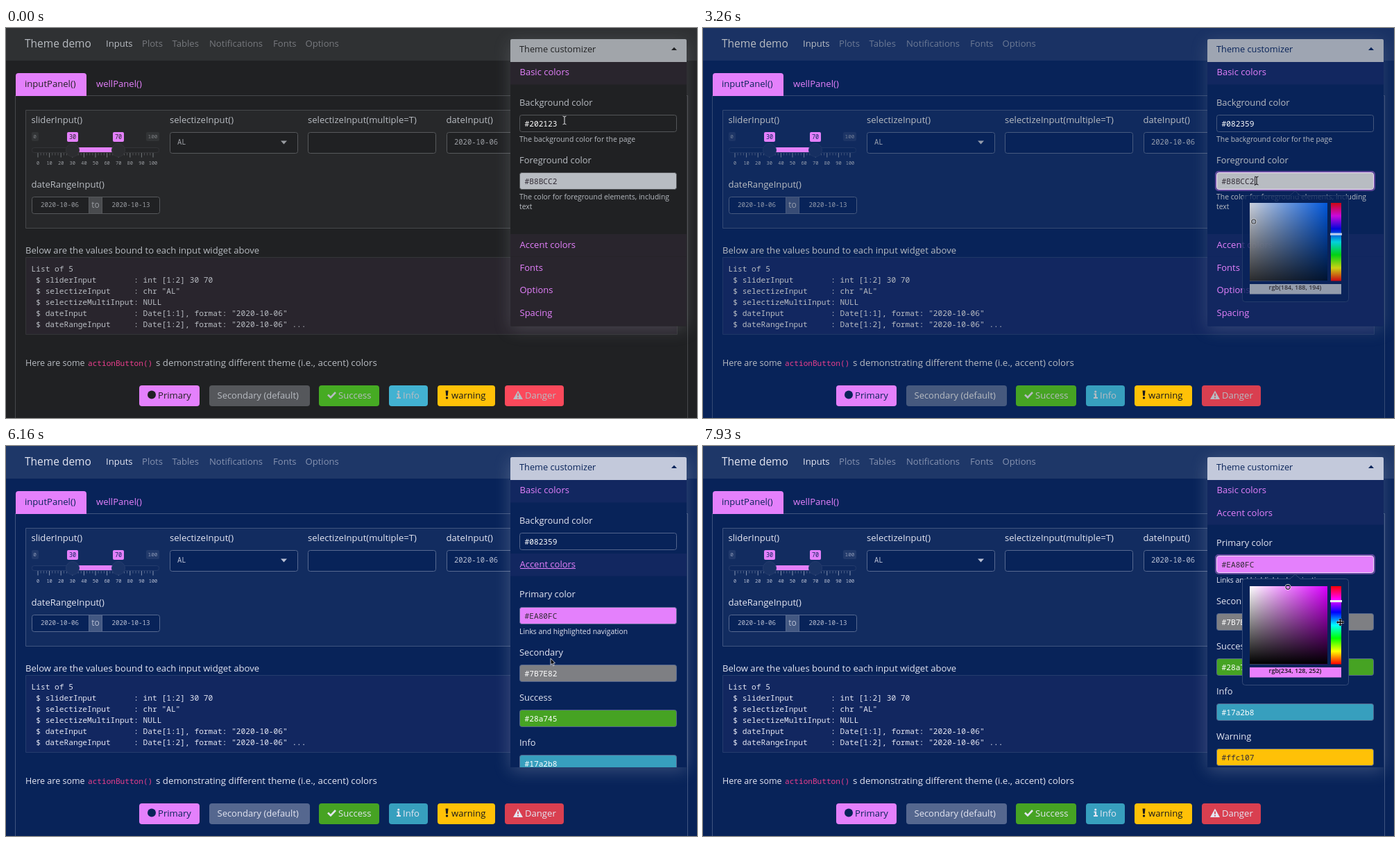
An HTML page with a canvas for the animation above (8000 ms loop, 996 by 562 pixels).

```html
<!DOCTYPE html>
<html lang="en">
<head>
<meta charset="utf-8">
<title>Theme demo</title>
<style>
html, body { margin: 0; width: 100%; height: 100%; overflow: hidden; background: #202123; }
canvas { display: block; width: 996px; height: 562px; }
</style>
</head>
<body>
<canvas id="stage" width="996" height="562"></canvas>
<script>
const ctx = document.getElementById('stage').getContext('2d');
const LOOP = 8000;
const SANS = '"Open Sans", "Noto Sans", sans-serif';
const MONO = '"Noto Sans Mono", "DejaVu Sans Mono", monospace';
const PINK = [228, 128, 252], WHITE = [255, 255, 255], INK = [50, 44, 54];
const PRIMARY = [234, 128, 252];
const DARK = [32, 33, 35], NAVY = [8, 35, 89];
const GREY = [184, 188, 194], PALE = [228, 230, 242];
const YELLOW = [255, 193, 7];

const clamp = v => Math.max(0, Math.min(1, v));
const ramp = (t, a, b) => clamp((t - a) / (b - a));
const mix = (a, b, k) => a.map((v, i) => v + (b[i] - v) * k);
const css = (c, a = 1) => `rgba(${c.map(Math.round).join(',')},${a})`;
const hex = c => '#' + c.map(v => v.toString(16).padStart(2, '0')).join('').toUpperCase();

// cubic-bezier(.25, .1, .25, 1)
function ease(x) {
  let lo = 0, hi = 1, u = x;
  for (let i = 0; i < 20; i++) {
    u = (lo + hi) / 2;
    const bx = .75 * u * (1 - u) + u ** 3;
    if (bx < x) lo = u; else hi = u;
  }
  return .3 * u * (1 - u) * (1 - u) + 3 * u * u * (1 - u) + u ** 3;
}

function text(s, x, y, color, size = 13.1, font = SANS, align = 'left', weight = 400) {
  ctx.font = `${weight} ${size}px ${font}`;
  ctx.textAlign = align;
  ctx.fillStyle = css(color);
  ctx.fillText(s, x, y);
}
const mono = (s, x, y, color, size = 11.2, align) => text(s, x, y, color, size, MONO, align);

function box(x, y, w, h, fill, stroke, r = 0) {
  ctx.beginPath();
  ctx.roundRect(x, y, w, h, r);
  if (fill) { ctx.fillStyle = css(fill); ctx.fill(); }
  if (stroke) { ctx.strokeStyle = css(stroke); ctx.lineWidth = 1; ctx.stroke(); }
}

function poly(points, fill) {
  ctx.beginPath();
  points.forEach(([x, y]) => ctx.lineTo(x, y));
  ctx.closePath();
  ctx.fillStyle = css(fill);
  ctx.fill();
}

function line(points, color, width) {
  ctx.beginPath();
  points.forEach(([x, y]) => ctx.lineTo(x, y));
  ctx.strokeStyle = css(color);
  ctx.lineWidth = width;
  ctx.stroke();
}

function circle(x, y, r, fill, stroke, width = 1) {
  ctx.beginPath();
  ctx.arc(x, y, r, 0, Math.PI * 2);
  if (fill) { ctx.fillStyle = css(fill); ctx.fill(); }
  if (stroke) { ctx.strokeStyle = css(stroke); ctx.lineWidth = width; ctx.stroke(); }
}

function themeAt(t) {
  const toNavy = t < 2200 ? 0 : t < 2230 ? .5 : 1;
  const toPale = ramp(t, 4800, 4960);
  const bg = mix(DARK, NAVY, toNavy), fg = mix(GREY, PALE, toPale);
  return {
    bg, fg,
    shade: k => mix(bg, fg, k),
    tint: mix(bg, PINK, .045),
    green: mix([70, 171, 35], [70, 163, 35], toNavy),
    info: mix([66, 178, 209], [55, 159, 190], toNavy),
    red: mix([251, 73, 91], [217, 63, 80], toNavy)
  };
}

function slider(th) {
  const { bg, shade } = th;
  box(37.5, 172.5, 183, 7, shade(.03), shade(.13), 3);
  for (let i = 0; i <= 40; i++) {
    const big = i % 4 === 0, x = 46 + i * 4.15;
    line([[x, 180], [x, big ? 186.5 : 183.5]], shade(big ? .7 : .4), .8);
  }
  for (let i = 0; i <= 10; i++) mono(i * 10, 46 + i * 16.6, 196.5, shade(.8), 7, 'center');
  box(96, 172, 66, 7, PINK);
  [96, 162].forEach(x => circle(x, 176, 9.5, shade(.08), shade(.13)));
  box(37, 150, 10, 13, shade(.12), null, 2);
  mono('0', 41.5, 159, shade(.6), 7.8, 'center');
  box(202, 150, 19, 13, shade(.12), null, 2);
  mono('100', 211.5, 159, shade(.6), 7.8, 'center');
  [[96, '30'], [162, '70']].forEach(([x, s]) => {
    box(x - 8, 150, 16, 14, PINK, null, 2);
    mono(s, x, 159.5, bg, 8.4, 'center');
  });
}

function buttons(th) {
  const { bg, fg, shade, green, info, red } = th;
  [[192, 87, PINK], [293, 145, shade(.35)], [451, 87, green], [552, 56, info],
   [622, 83, YELLOW], [719, 85, red]].forEach(([x, w, c]) => box(x, 515, w, 30, c, null, 4));
  const y = 533.5;
  circle(210, 528.5, 6, bg);
  text('Primary', 219, y, bg);
  text('Secondary (default)', 304.5, y, fg, 13);
  line([[464, 528.5], [468, 532.5], [475, 525]], fg, 2.6);
  text('Success', 479, y, fg);
  circle(565.8, 524, 1.6, fg);
  line([[563.5, 527.5], [566, 527.5], [566, 533]], fg, 2.2);
  line([[563, 533], [569, 533]], fg, 2);
  text('Info', 572, y, fg);
  const black = [25, 25, 28];
  poly([[633.5, 522.5], [637.5, 522.5], [636.7, 530], [634.3, 530]], black);
  circle(635.5, 533, 1.7, black);
  text('warning', 642, y, black, 13.1, SANS, 'left', 500);
  poly([[738, 522.5], [745, 535], [731, 535]], fg);
  line([[738, 526.5], [738, 530.5]], red, 1.7);
  circle(738, 532.7, 1, red);
  text('Danger', 748, y, fg);
}

function page(th) {
  const { bg, fg, shade } = th;
  ctx.fillStyle = css(bg);
  ctx.fillRect(0, 0, 996, 562);
  box(0, 0, 996, 47, shade(.1));
  text('Theme demo', 27, 27.5, fg, 15.5);
  [['Inputs', 144], ['Plots', 196], ['Tables', 239.5], ['Notifications', 293], ['Fonts', 385], ['Options', 431.5]]
    .forEach(([s, x], i) => text(s, x, 27, i ? shade(.57) : fg));

  const edge = shade(.25);
  line([[13.5, 570], [13.5, 97.5], [982.5, 97.5], [982.5, 570]], edge, 1);
  box(14, 65, 102, 33, PINK, null, [4, 4, 0, 0]);
  text('inputPanel()', 27, 84.5, bg);
  text('wellPanel()', 130, 84.5, PINK);

  box(28.5, 118.5, 939, 170, shade(.045), edge);
  [['sliderInput()', 36.5], ['selectizeInput()', 236], ['selectizeInput(multiple=T)', 435], ['dateInput()', 634.5]]
    .forEach(([s, x]) => text(s, x, 136.5, fg));
  slider(th);
  const border = shade(.36), soft = shade(.8);
  [236.5, 435.5, 635.5].forEach(x => box(x, 150.5, 184, 30, bg, border, 3));
  mono('AL', 247, 168, soft, 10.5);
  poly([[396, 162.5], [405, 162.5], [400.5, 167.5]], soft);
  mono('2020-10-06', 646, 168, soft, 10.5);
  text('dateRangeInput()', 36.5, 229.5, fg);
  box(37.5, 243.5, 184, 24, bg, border, 3);
  box(119.5, 243.5, 19, 24, shade(.27), border);
  text('to', 129, 258.5, soft, 12, SANS, 'center');
  mono('2020-10-06', 50, 257.5, soft, 9.2);
  mono('2020-10-13', 152.5, 257.5, soft, 9.2);

  text('Below are the values bound to each input widget above', 28, 324.5, fg);
  box(28.5, 330.5, 939, 111, th.tint, shade(.13));
  ['List of 5',
   ' $ sliderInput        : int [1:2] 30 70',
   ' $ selectizeInput     : chr "AL"',
   ' $ selectizeMultiInput: NULL',
   ' $ dateInput          : Date[1:1], format: "2020-10-06"',
   ' $ dateRangeInput     : Date[1:2], format: "2020-10-06" ...'
  ].forEach((s, i) => mono(s, 36.5, 351 + i * 16, fg));

  text('Here are some', 28, 487, fg, 12.5);
  mono('actionButton()', 118, 486.5, [232, 62, 140], 11.1);
  text('s demonstrating different theme (i.e., accent) colors', 216, 487, fg, 13.3);
  buttons(th);
}

function field(th, y, value, color, focus, caret) {
  const lum = color[0] * .3 + color[1] * .59 + color[2] * .11;
  const ink = lum > 150 ? INK : WHITE;
  if (focus > 0) {
    ctx.beginPath();
    ctx.roundRect(739, y - 1, 229, 27, 4);
    ctx.strokeStyle = css(PINK, .4 * focus);
    ctx.lineWidth = 2;
    ctx.stroke();
  }
  box(740.5, y + .5, 226, 24, color, mix(th.shade(.34), [246, 220, 254], focus), 3);
  mono(value, 747.5, y + 16.7, ink);
  if (caret) line([[795.5, y + 6.5], [795.5, y + 19]], ink, 1);
}

const blink = (t, from, to) => t >= from && t < to && Math.floor((t - from) / 500) % 2 === 0;

function panel(th, t, bgValue, fgValue) {
  const { bg, fg, shade, tint } = th;
  const p = ease(ramp(t, 6027, 6377));
  const top = Math.round(297 - 216 * p), rowH = 32.6;
  const fontsTop = top + rowH + 455 * p;
  const bottom = Math.min(463, fontsTop + 3 * rowH + 2);

  ctx.save();
  ctx.shadowColor = css(fg, .22);
  ctx.shadowBlur = 24;
  ctx.shadowOffsetY = 5;
  box(727, 16, 254, bottom - 16, bg, null, 2);
  ctx.restore();
  box(727, 16, 254, 33, shade(.85), null, [2, 2, 0, 0]);
  text('Theme customizer', 740, 35.2, bg, 12.8, SANS, 'left', 500);
  poly([[959, 32], [967, 32], [963, 27.8]], bg);

  ctx.save();
  ctx.beginPath();
  ctx.rect(727, 49, 254, bottom - 49);
  ctx.clip();
  box(727, 49, 254, rowH, tint);
  text('Basic colors', 740.5, 68.3, PINK, 13);

  const focusBg = ramp(t, 30, 180) * (1 - ramp(t, 2950, 3080));
  const focusFg = ramp(t, 3000, 3150) * (1 - ramp(t, 5880, 6010));
  if (p < 1) {
    text('Background color', 740, 111.5, fg, 12.9);
    field(th, 125, hex(bgValue), bgValue, focusBg, blink(t, 160, 1600));
    text('The background color for the page', 740, 163.8, fg, 10.4);
    text('Foreground color', 740, 195, fg, 12.9);
    field(th, 208, hex(fgValue), fgValue, focusFg, blink(t, 3000, 4830));
    text('The color for foreground elements, including', 740, 246.8, fg, 10.4);
    text('text', 740, 261.3, fg, 10.4);
  }

  box(727, top, 254, bottom - top, bg);
  if (p > 0) {
    text('Primary color', 740, top + 63.2, fg, 12.9);
    field(th, top + 77, '#EA80FC', PINK, ramp(t, 7300, 7450), blink(t, 7300, LOOP));
    text('Links and highlighted navigation', 740, top + 115.5, fg, 10.4);
    [['Secondary', '#7B7E82', [126, 127, 131]], ['Success', '#28a745', th.green],
     ['Info', '#17a2b8', th.info], ['Warning', '#ffc107', YELLOW], ['Danger', '#dc3545', th.red]]
      .forEach(([label, value, color], i) => {
        const y = top + 142 + i * 65;
        text(label, 740, y + 4.5, fg, 12.9);
        field(th, y + 18, value, color, 0, false);
      });
  }
  box(727, top, 254, rowH, tint);
  text('Accent colors', 740.5, top + 20, PINK, 13);
  if (t > 5900 && t < 7300) line([[741, top + 21.5], [821, top + 21.5]], PINK, 1);
  box(727, fontsTop, 254, 100, tint);
  ['Fonts', 'Options', 'Spacing'].forEach((s, i) => text(s, 740.5, fontsTop + 20 + i * rowH, PINK, 13));
  ctx.restore();

  const ring = ramp(t, 6260, 6460) * (1 - ramp(t, 7250, 7400));
  if (ring > 0) {
    ctx.strokeStyle = css(PINK, .25 * ring);
    ctx.lineWidth = 2.5;
    ctx.strokeRect(726.5, 80.5, 255, 35);
  }
}

const hueColor = h => [0, 8, 4].map(n => {
  const k = (n + h / 30) % 12;
  return 255 * (.5 - .5 * Math.max(-1, Math.min(k - 3, 9 - k, 1)));
});

function picker(th, y, color, alpha) {
  if (alpha <= 0) return;
  const [r, g, b] = color, max = Math.max(r, g, b), d = max - Math.min(r, g, b);
  const h = 60 * (max === r ? ((g - b) / d + 6) % 6 : max === g ? (b - r) / d + 2 : (r - g) / d + 4);
  const size = 112.5, edge = th.shade(.2);
  ctx.save();
  ctx.globalAlpha = alpha;
  box(777.5, y - 10.5, 153, 153, th.bg, edge, 4);
  poly([[846, y - 10], [853.5, y - 16.5], [861, y - 10]], th.bg);
  line([[846, y - 10.5], [853.5, y - 17], [861, y - 10.5]], edge, 1);

  const fillGrad = (x, w, x1, y1, stops) => {
    const grad = ctx.createLinearGradient(x, y, x1, y1);
    stops.forEach((c, i) => grad.addColorStop(i / (stops.length - 1), c));
    ctx.fillStyle = grad;
    ctx.fillRect(x, y, w, size);
  };
  fillGrad(788, 112, 900, y, ['#fff', css(hueColor(h))]);
  fillGrad(788, 112, 788, y + size, ['rgba(0,0,0,0)', '#000']);
  fillGrad(905, 15, 905, y + size, ['#f00', '#f0f', '#00f', '#0ff', '#0f0', '#ff0', '#f00']);

  box(904, y + size * (1 - h / 360) - 1.5, 17, 3.2, [238, 238, 245]);
  const hx = 788 + 112 * d / max, hy = y + size * (1 - max / 255);
  const light = max > 150;
  circle(hx, hy, 4, null, light ? WHITE : [20, 20, 20], 1);
  circle(hx, hy, 3.1, null, light ? [30, 30, 30] : WHITE, 1.1);

  box(788, y + 117, 132, 14.5, color);
  text(`rgb(${color.join(', ')})`, 853.5, y + 124.6, light ? [25, 22, 28] : WHITE, 9, SANS, 'center', 600);
  ctx.restore();
}

// time, x, y
const PATH = [
  [0, 805, 133], [500, 805, 133], [930, 885, 240], [1160, 885, 240], [1360, 889.5, 242.5], [2630, 890, 242],
  [2950, 798, 220], [3460, 798, 220], [4200, 766, 254], [4400, 766, 254], [4640, 794, 256],
  [5430, 794, 256], [5850, 785, 306], [6260, 785, 306], [6460, 911, 240], [6700, 911, 240],
  [6730, 913, 238], [7200, 802, 171], [7760, 802, 171], [7930, 918.5, 254], [8000, 918.5, 254]
];

function pointer(t) {
  let i = 1;
  while (PATH[i][0] < t) i++;
  const [t0, x0, y0] = PATH[i - 1], [t1, x1, y1] = PATH[i];
  const k = ramp(t, t0, t1), s = k * k * (3 - 2 * k);
  return [x0 + (x1 - x0) * s, y0 + (y1 - y0) * s];
}

function plus(x, y, r, color, width) {
  line([[x - r, y], [x + r, y]], color, width);
  line([[x, y - r], [x, y + r]], color, width);
}

function cursor(t) {
  const [x, y] = pointer(t);
  const black = [15, 15, 18];
  const inside = (l, tp, r, b) => x > l && x < r && y > tp && y < b;
  if (t > 7800 && x > 788) {
    plus(x, y, 5, WHITE, 3.6);
    plus(x, y, 4.5, black, 1.8);
    for (let i = 0; i < 4; i++) {
      const dx = [1, 0, -1, 0][i], dy = [0, 1, 0, -1][i];
      poly([[x + dx * 5.5, y + dy * 5.5], [x + dx * 3 - dy * 2.4, y + dy * 3 + dx * 2.4],
            [x + dx * 3 + dy * 2.4, y + dy * 3 - dx * 2.4]], black);
    }
  } else if (t < 2900 && inside(788, 168, 900, 281)) {
    plus(x, y, 5, black, 3.4);
    plus(x, y, 4.4, [225, 228, 236], 1.6);
  } else if (t > 3400 && t < 5880 && inside(788, 252, 900, 364)) {
    plus(x, y, 4.5, black, 1);
  } else if (inside(740, 124, 967, 150) && t < 5000 || inside(740, 208, 967, 233) && t < 6000 ||
             inside(740, 158, 967, 183) && t > 6400) {
    const c = t < 2700 ? [215, 216, 220] : black;
    line([[x, y - 5], [x, y + 5]], c, 1.1);
    line([[x - 2.5, y - 6], [x, y - 5], [x + 2.5, y - 6]], c, 1);
    line([[x - 2.5, y + 6], [x, y + 5], [x + 2.5, y + 6]], c, 1);
  } else {
    const shape = [[0, 0], [0, 9.5], [2.2, 7.6], [3.7, 10.8], [5.2, 10.1], [3.8, 7], [6.5, 6.8]]
      .map(([a, b]) => [x + a, y + b]);
    poly(shape, black);
    line([...shape, shape[0]], [215, 218, 228], .9);
  }
}

function draw(t) {
  const th = themeAt(t);
  const bgValue = t < 1600 ? DARK : NAVY, fgValue = t < 4830 ? GREY : PALE;
  page(th);
  panel(th, t, bgValue, fgValue);
  picker(th, 168, bgValue, ramp(t, 30, 330) * (1 - ramp(t, 2950, 3100)));
  picker(th, 252, fgValue, ramp(t, 3000, 3330) * (1 - ramp(t, 5880, 6030)));
  picker(th, 202, PRIMARY, ramp(t, 7300, 7600));
  cursor(t);
}

const start = performance.now();
function tick() {
  draw((performance.now() - start) % LOOP);
  requestAnimationFrame(tick);
}
tick();
</script>
</body>
</html>
```
